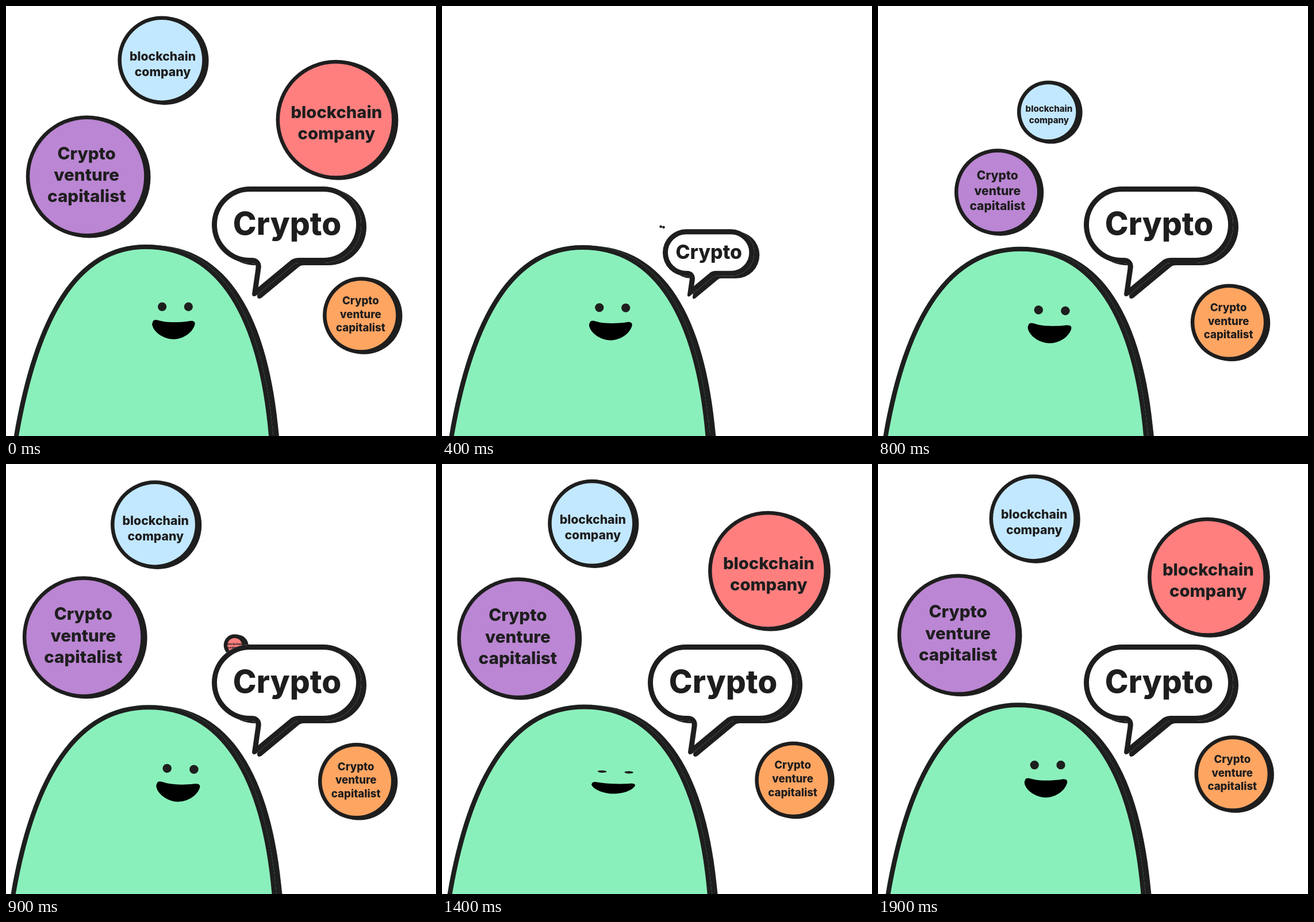
An HTML page with a canvas that plays this animation: 748 px wide and 748 px high, repeating every 2000 ms.

```html
<!DOCTYPE html>
<html lang="en">
<head>
<meta charset="utf-8">
<title>Crypto</title>
<style>
  html, body { margin: 0; width: 100%; height: 100%; overflow: hidden; background: #fff; }
  canvas { display: block; }
</style>
</head>
<body>
<canvas id="stage" width="748" height="748"></canvas>
<script>
const ctx = document.getElementById('stage').getContext('2d');
const INK = '#1e1e1e';
const LOOP = 2000, STEP = 100, CUT = 100, POP = 310;

const COMPANY = ['blockchain', 'company'];
const INVESTOR = ['Crypto', 'venture', 'capitalist'];

// from: where the circle pops out; drift: offset at the far end of its sway
const circles = [
  { x: 271.3, y: 94, r: 76.7, color: '#c2e8ff', lines: COMPANY, size: 21.2, textX: 1.5, textY: 0.5,
    drift: [-13.6, 12.2], from: [385, 380], start: 580, low: 80, peak: 1080 },
  { x: 141, y: 296.3, r: 106, color: '#bb86d3', lines: INVESTOR, size: 29.6, textX: -0.5, textY: -30,
    drift: [-8.7, 6.9], from: [385, 380], start: 580, low: 80, peak: 1370 },
  { x: 618, y: 537.8, r: 66.8, color: '#ffa562', lines: INVESTOR, size: 18.6, textX: -1, textY: -19,
    drift: [-9, 15.2], from: [372, 378], start: 389, low: 80, peak: 1080 },
  { x: 573.7, y: 198, r: 104, color: '#ff7f7f', lines: COMPANY, size: 29.2, textX: 1.3, textY: -3,
    drift: [-8.7, -16], from: [360, 345], start: 843, low: 80, peak: 1080 }
];

const balloon = new Path2D(
  'M424.5 314H551.5A66.5 66.5 0 0 1 551.5 447H509Q503 447 499 451L435 504Q428.500 507 428 501' +
  'L434.500 456Q436 447 427 447H424.500A66.5 66.5 0 0 1 424.500 314Z');

const mouth = new Path2D(
  'M255 550C257 543 264 547 272 548.500C285 551 305 550 318 548C326 546.500 330 549 328 555' +
  'C323 570 306 579.500 291 579.500C273 579.500 255 566 254 553Z');

const clamp = v => Math.max(0, Math.min(1, v));
const mix = (a, b, k) => a + (b - a) * k;
const pop = (t, start) => t < CUT ? 1 : clamp((t - start) / POP);

// Cosine sway: 0 at low, 1 at peak, back to 0 one loop later
function sway(t, low = 80, peak = 1080) {
  const since = (t - low + LOOP) % LOOP, rise = peak - low;
  const phase = since < rise ? since / rise : 1 + (since - rise) / (LOOP - rise);
  return 0.5 - 0.5 * Math.cos(Math.PI * phase);
}

function layer(draw) {
  ctx.save();
  draw();
  ctx.restore();
}

function fillPath(path, color) {
  ctx.fillStyle = color;
  ctx.fill(path);
}

function ellipse(x, y, rx, ry, color) {
  ctx.beginPath();
  ctx.ellipse(x, y, rx, ry, 0, 0, Math.PI * 2);
  ctx.fillStyle = color;
  ctx.fill();
}

function label(text, x, y, size) {
  ctx.font = `800 ${size}px Inter, sans-serif`;
  ctx.textAlign = 'center';
  ctx.fillStyle = INK;
  ctx.fillText(text, x, y);
}

// Fill with an outline that lies inside the edge and keeps its weight when scaled
function insetOutline(path, fill, weight, scale = 1) {
  layer(() => {
    fillPath(path, fill);
    ctx.clip(path);
    ctx.strokeStyle = INK;
    ctx.lineWidth = 2 * weight / scale;
    ctx.stroke(path);
  });
}

function drawCircle(c, t) {
  const p = pop(t, c.start);
  if (!p) return;
  const k = sway(t, c.low, c.peak);
  const x = mix(c.from[0], c.x + c.drift[0] * k, p);
  const y = mix(c.from[1], c.y + c.drift[1] * k, p);
  const r = c.r * p;
  ellipse(x + 4.8, y + 1, r, r, INK);
  ellipse(x, y, r, r, INK);
  if (r <= 6.5) return;
  ellipse(x, y, r - 6.5, r - 6.5, c.color);
  layer(() => {
    ctx.translate(x, y);
    ctx.scale(p, p);
    c.lines.forEach((line, i) =>
      label(line, c.textX, c.textY + i * c.size * 1.265, c.size));
  });
}

function drawBody(k) {
  const top = 415 + 4.5 * k, mid = 243 + 6 * k;
  const left = 14 - 5.8 * k, right = 465 + 6 * k;
  const body = new Path2D(
    `M${left - 3} 768L${left} 748C${left + 36} 540 ${120 + k} ${top} ${mid} ${top}` +
    `C${376 + 3 * k} ${top} ${right - 18} 540 ${right} 748L${right + 2} 768Z`);
  layer(() => {
    ctx.translate(10, 1);
    fillPath(body, INK);
  });
  insetOutline(body, '#8af0bb', 8);
}

function drawFace(k, blink) {
  layer(() => {
    ctx.translate(271.5 + 9.5 * k, 523 + 7 * k);
    ctx.rotate(0.04 * k);
    ctx.scale(1 + 0.025 * k, 1 + 0.015 * k);
    for (const x of [0, 45.7])
      ellipse(x, 6.5 * blink, 7.6, mix(7.6, 2, blink), INK);
    ctx.translate(0, 27);
    ctx.scale(1, 1 - 0.42 * blink);
    ctx.translate(-271.5, -550);
    fillPath(mouth, '#000');
  });
}

function drawBalloon(s) {
  if (!s) return;
  const grow = (dx, dy, draw) => layer(() => {
    ctx.translate(425 + dx, 506 + dy);
    ctx.scale(s, s);
    ctx.translate(-425, -506);
    draw();
  });
  grow(9, 4, () => fillPath(balloon, INK));
  grow(0, 0, () => {
    insetOutline(balloon, '#fff', 9, s);
    label('Crypto', 489, 398, 55);
  });
}

function render(now) {
  const t = Math.floor(now % LOOP / STEP) * STEP;
  const k = sway(t);
  const blink = clamp(1 - Math.abs(t - 1400) / 200);
  ctx.fillStyle = '#fff';
  ctx.fillRect(0, 0, 748, 748);
  circles.forEach(c => drawCircle(c, t));
  drawBody(k);
  drawFace(k, blink);
  drawBalloon(pop(t, 210));
  requestAnimationFrame(render);
}
requestAnimationFrame(render);
</script>
</body>
</html>
```
